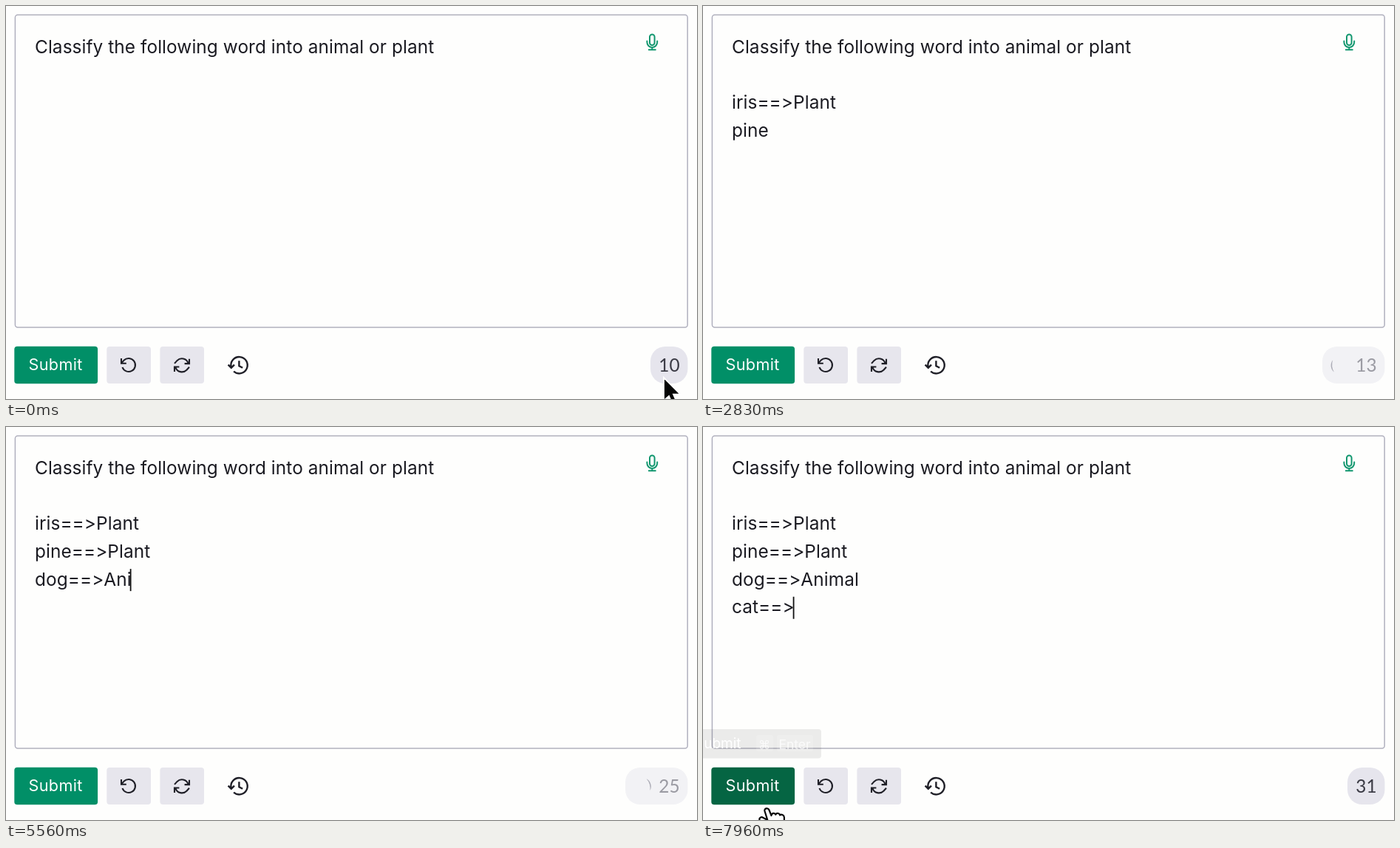
Animation, 935 px wide and 532 px high, one loop 8000 ms. Source, as an HTML page:

```html
<!DOCTYPE html>
<html lang="en">
<head>
<meta charset="utf-8">
<title>Word classifier prompt</title>
<style>
html, body { margin: 0; width: 100%; height: 100%; overflow: hidden; background: #fefefd; }
svg { display: block; width: 100%; height: 100%; }
text { font-family: Inter, Roboto, sans-serif; font-feature-settings: "calt" 0, "liga" 0; }
.prompt { font-size: 24.4px; letter-spacing: .07px; fill: #1a1a21; white-space: pre; }
.label { font-size: 21.6px; letter-spacing: .35px; fill: #fff; }
.count { font: 24.4px Lato, "Open Sans", sans-serif; }
.icon { fill: none; stroke: #1f1f27; stroke-width: 2.1; }
.tip text { font-size: 19px; fill: #fff; }
</style>
</head>
<body>
<svg viewBox="0 0 935 532">
  <rect width="935" height="532" fill="#fefefd"/>
  <rect x="12.4" y="12" width="909.8" height="423" rx="3.5" fill="none" stroke="#b1b1bf" stroke-width="1.5"/>
  <g id="lines"></g>
  <rect id="caret" width="1.8" height="30" fill="#111"/>

  <g class="icon" style="stroke:#12976f;stroke-width:2" stroke-linecap="round">
    <rect x="871" y="38.4" width="6.6" height="14.6" rx="3.3"/>
    <path d="M867.4 47.5v1.6a6.9 6.9 0 0 0 13.8 0v-1.6M874.3 56v3.2M869.8 59.2h9"/>
  </g>

  <rect id="submit" x="11.3" y="460.7" width="112.8" height="50.6" rx="4"/>
  <text class="label" x="30.5" y="492.8">Submit</text>
  <rect x="136.3" y="461" width="59.7" height="50" rx="4" fill="#e7e6ed"/>
  <rect x="208.4" y="461" width="59.6" height="50" rx="4" fill="#e7e6ed"/>
  <path class="icon" transform="translate(154 474)" d="M2 3v6.8h6.8M3.5 15a9 9 0 1 0 2.1-9.4L2 9.6"/>
  <path class="icon" transform="translate(226 474.3)" d="M22 3.4v6.4h-6.4M2 20.6v-6.4h6.4M20.5 9A9 9 0 0 0 5.6 5.6L2 9.6M22 14.4l-3.6 4A9 9 0 0 1 3.5 15"/>
  <path class="icon" style="stroke-width:2.4" d="M304.7 489a11.2 11.2 0 1 1 3.4 5.6M300.6 485.6l4.2 4.2 4.2-4.2M315.4 480.2v7l4.8 2.6"/>

  <rect id="pill" y="461" height="50" rx="20"/>
  <path id="spinner" fill="#acacb6" d="M8.2-8.2A11.6 11.6 0 0 1 8.2 8.2A20 20 0 0 0 8.2-8.2"/>
  <text id="count" class="count" x="883.3" y="495.2"></text>

  <g id="tip" class="tip">
    <rect x="-26" y="409" width="186" height="39.5" rx="4" fill="#35353c" opacity=".095"/>
    <g fill="#fff" opacity=".15">
      <rect x="72" y="417" width="23" height="22" rx="3"/>
      <rect x="100" y="417" width="49" height="22" rx="3"/>
    </g>
    <text x="-11" y="434.5">Submit</text>
    <g opacity=".75">
      <text x="75" y="435.5" style="font-family:'DejaVu Sans',sans-serif;font-size:16px">⌘</text>
      <text x="102.5" y="436" style="font-size:17.4px">Enter</text>
    </g>
  </g>

  <path id="arrow" d="M0 0V31l7-6 5 11.5 6-2.6-5-11.2h9.5Z" fill="#050505" stroke="#fff" stroke-width="1.8"/>
  <path id="hand" fill="#fff" stroke="#0a0a0a" stroke-width="2.2" stroke-linejoin="round"
    d="M0 3.5C-1-.5 4.6-1.5 6 2L9 9.5C9.4 5.8 13.6 5.4 14.8 8.2C16 5.6 20 6 20.6 9C22.4 7.2 26.2 8.6 26.4 12V23Q25 29 22 32V37H7V33Q2 28-1 22L-6.5 16.5C-8.6 12.8-4.5 10.2-2 12.5L3.8 15.5Z"/>
</svg>
<script>
const LOOP = 8000;
const HEAD = "Classify the following word into animal or plant";
const LEFT = 39, BASE = 64, LEADING = 37.65;

// [text, time of first key, ms per key]
const BURSTS = [
  ["\n\n", 500, 110], ["iris", 700, 120], ["==>", 1230, 130], ["Plant", 1620, 120],
  ["\n", 2260, 0], ["pine", 2400, 120], ["==>", 2950, 130], ["Plant", 3380, 120],
  ["\n", 4080, 0], ["dog", 4300, 130], ["==>", 4750, 130], ["Animal", 5200, 130],
  ["\n", 6000, 0], ["cat", 6120, 100], ["==>", 6900, 130]
];
// [time, token count, spinner phase in degrees]
const COUNTS = [[0, 10, -103], [1410, 13, -105], [3110, 19, 164], [4910, 25, 194], [6670, 29, 0], [7510, 31, 0]];
const BUSY = [[500, 6670], [6900, 7510]];

const $ = id => document.getElementById(id);
const set = (el, attrs) => { for (const k in attrs) el.setAttribute(k, attrs[k]); };
const show = (el, on) => set(el, { visibility: on ? "visible" : "hidden" });
const ramp = (t, a, b) => Math.min(1, Math.max(0, (t - a) / (b - a)));
const mix = (a, b, p) => a + (b - a) * p;

const rows = [0, 1, 2, 3, 4, 5].map(i => {
  const row = document.createElementNS("http://www.w3.org/2000/svg", "text");
  set(row, { class: "prompt", x: LEFT, y: BASE + i * LEADING });
  return $("lines").appendChild(row);
});

function typed(t) {
  let text = HEAD;
  for (const [keys, start, step] of BURSTS) {
    if (t < start) break;
    text += keys.slice(0, step ? Math.floor((t - start) / step) + 1 : 1);
  }
  return text;
}

function drawPrompt(t) {
  const lines = typed(t).split("\n");
  rows.forEach((row, i) => {
    const s = lines[i] || "";
    if (row.textContent !== s) row.textContent = s;
  });
  const last = lines.length - 1;
  const width = lines[last] ? rows[last].getComputedTextLength() - 2 : 0;
  set($("caret"), { x: LEFT + width, y: BASE + last * LEADING - 22.5 });
  const shift = t < 7000 ? 250 : 520;
  show($("caret"), (t - shift + LOOP) % 1000 < 500);
}

function drawCounter(t) {
  const busy = BUSY.some(([a, b]) => t >= a && t < b);
  const [, count, phase] = COUNTS.filter(c => t >= c[0]).pop();
  const x = busy ? 838 : 872;
  set($("pill"), { x, width: 922.5 - x, fill: busy ? "#f2f2f5" : "#e6e5ed" });
  $("count").textContent = count;
  set($("count"), { fill: busy ? "#9b9ba3" : "#3b3b45" });
  set($("spinner"), { transform: `translate(861.2 486.5) rotate(${phase + t * 0.48})` });
  show($("spinner"), busy);
}

function drawPointer(t) {
  const out = ramp(t, 0, 350) ** 1.3;
  set($("arrow"), { transform: `translate(${mix(890, 916, out)} ${mix(503, 540, out)})` });
  show($("arrow"), t < 360);

  const rise = ramp(t, 7840, 7960);
  set($("hand"), { transform: `translate(${mix(88, 83.5, rise)} ${mix(540, 516.5, rise)})` });
  show($("hand"), t > 7840);

  const hover = ramp(t, 7890, 7955);
  const tone = [[1, 5], [143, 101], [103, 67]].map(([a, b]) => Math.round(mix(a, b, hover)));
  set($("submit"), { fill: `rgb(${tone})` });
  set($("tip"), { opacity: ramp(t, 7910, 7960) });
}

function frame() {
  const t = performance.now() % LOOP;
  drawPrompt(t);
  drawCounter(t);
  drawPointer(t);
  requestAnimationFrame(frame);
}
frame();
</script>
</body>
</html>
```
